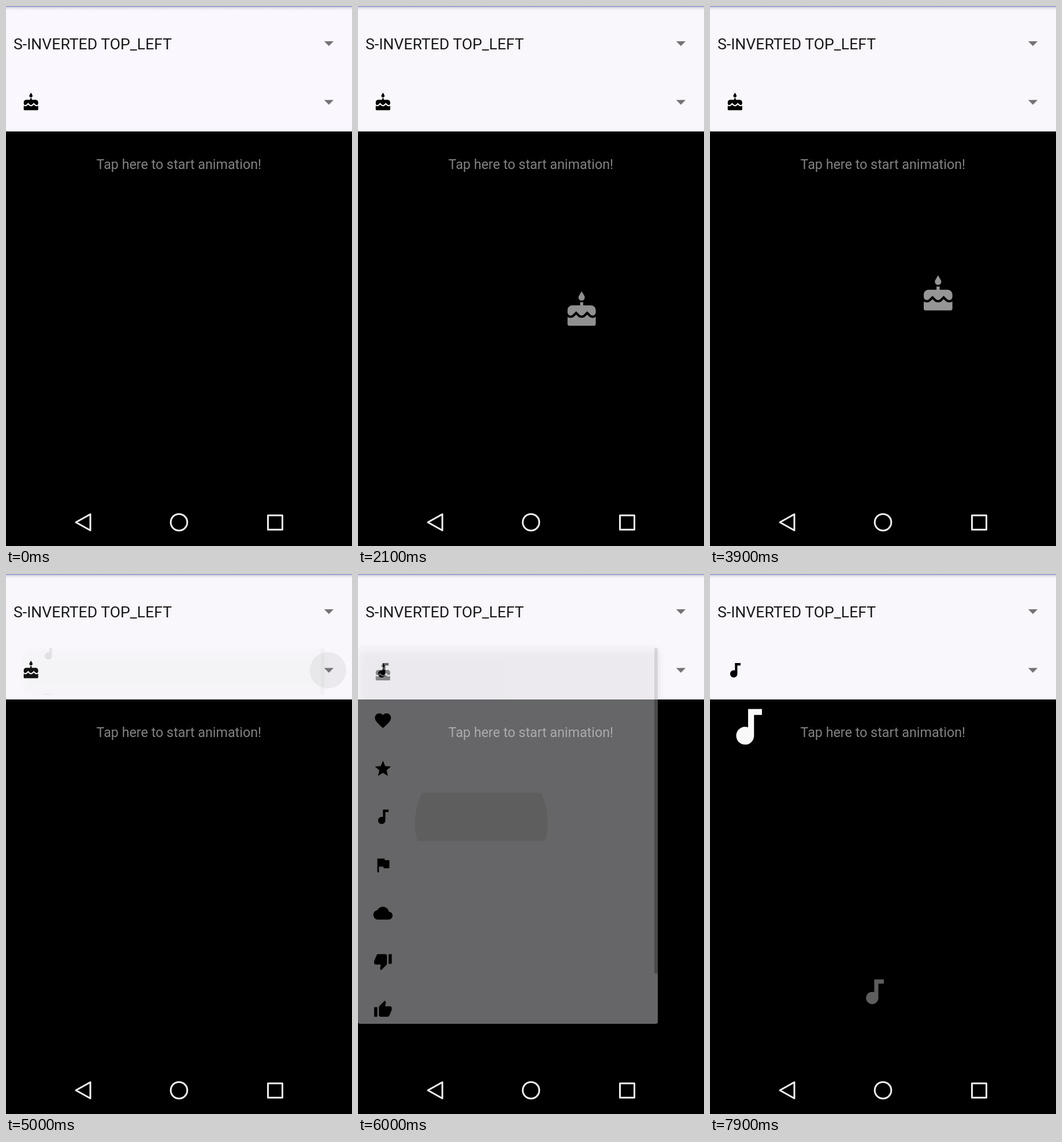
Recreate the animation shown at these times as an HTML page. Size 599 by 934 pixels, loop 8000 ms.

```html
<!DOCTYPE html>
<html lang="en">
<head>
<meta charset="utf-8">
<title>Flying icons</title>
<style>
  html, body { margin: 0; width: 100%; height: 100%; overflow: hidden; background: #000; }
  svg { display: block; width: 599px; height: 934px; }
  text { font-family: Roboto, sans-serif; }
  .nav { fill: none; stroke: #eee; stroke-width: 3; stroke-linejoin: round; }
  .hidden { display: none; }
</style>
</head>
<body>
<svg viewBox="0 0 599 934">
  <defs>
    <linearGradient id="edge" x2="0" y2="1">
      <stop stop-color="#a9afd2"/>
      <stop offset=".3" stop-color="#d9d9e6"/>
      <stop offset="1" stop-color="#f9f7fb" stop-opacity="0"/>
    </linearGradient>
    <filter id="soft" x="-10%" width="120%" y="-10%" height="120%"><feGaussianBlur stdDeviation="8"/></filter>
    <clipPath id="reveal"><rect id="window" width="519" rx="3"/></clipPath>
    <clipPath id="row"><rect y="378.4" width="512" height="83.3"/></clipPath>

    <path id="cake" d="M12 6c1.11 0 2-.9 2-2 0-.38-.1-.73-.29-1.03L12 0l-1.71 2.97c-.19.3-.29.65-.29 1.03 0 1.1.9 2 2 2zm4.6 9.99l-1.07-1.07-1.08 1.07c-1.3 1.3-3.58 1.31-4.89 0l-1.07-1.07-1.09 1.07C6.75 16.64 5.88 17 4.96 17c-.73 0-1.4-.23-1.96-.61V21c0 .55.45 1 1 1h16c.55 0 1-.45 1-1v-4.61c-.56.38-1.23.61-1.96.61-.92 0-1.79-.36-2.44-1.01zM18 9h-5V7h-2v2H6c-1.66 0-3 1.34-3 3v1.54c0 1.08.88 1.96 1.96 1.96.52 0 1.02-.2 1.38-.57l2.14-2.13 2.13 2.13c.74.74 2.03.74 2.77 0l2.14-2.13 2.13 2.13c.37.37.86.57 1.38.57 1.08 0 1.96-.88 1.96-1.96V12c0-1.66-1.34-3-3-3z"/>
    <path id="heart" d="M12 21.35l-1.45-1.32C5.4 15.36 2 12.28 2 8.5 2 5.42 4.42 3 7.5 3c1.74 0 3.41.81 4.5 2.09C13.09 3.81 14.76 3 16.5 3 19.58 3 22 5.42 22 8.5c0 3.78-3.4 6.86-8.55 11.54z"/>
    <path id="star" d="M12 17.27L18.18 21l-1.64-7.03L22 9.24l-7.19-.61L12 2 9.19 8.63 2 9.24l5.46 4.73L5.82 21z"/>
    <path id="note" d="M12 3v9.28c-.47-.17-.97-.28-1.5-.28C8.01 12 6 14.01 6 16.5S8.01 21 10.5 21c2.31 0 4.2-1.75 4.45-4H15V6h4V3z"/>
    <path id="flag" d="M14.4 6L14 4H5v17h2v-7h5.6l.4 2h7V6z"/>
    <path id="cloud" d="M19.35 10.04C18.67 6.59 15.64 4 12 4 9.11 4 6.6 5.64 5.35 8.04 2.34 8.36 0 10.91 0 14c0 3.31 2.69 6 6 6h13c2.76 0 5-2.24 5-5 0-2.64-2.05-4.78-4.65-4.96z"/>
    <path id="down" d="M15 3H6c-.83 0-1.54.5-1.84 1.22l-3.02 7.05c-.09.23-.14.47-.14.73v2c0 1.1.9 2 2 2h6.31l-.95 4.57-.03.32c0 .41.17.79.44 1.06L9.83 23l6.59-6.59c.36-.36.58-.86.58-1.41V5c0-1.1-.9-2-2-2zm4 0v12h4V3z"/>
    <use id="up" href="#down" transform="rotate(180 12 12)"/>
    <path id="arrow" d="M0 0h16.4l-8.2 8.3z" fill="#757376"/>
    <path id="route" d="M41.6 258.6C80 267 140 283 188 302C270 334 353 369 382 423C394 446 399 478 394 504C379 570 298 665 285 720C276 754 288 812 540 822L655 826"/>
  </defs>

  <rect width="599" height="934"/>
  <rect id="header" width="599" height="217"/>
  <rect width="599" height="9" fill="url(#edge)"/>
  <rect width="599" height="1.2" fill="#8790c6"/>
  <text x="13" y="75" font-size="26.6" fill="#19181b">S-INVERTED TOP_LEFT</text>
  <circle id="press" cx="557.5" cy="166.5" r="31.5"/>
  <use href="#arrow" x="550.8" y="61"/>
  <use href="#arrow" x="550.8" y="162.5"/>
  <use id="picked" transform="translate(43.2 166.5) scale(1.387) translate(-12 -12)"/>
  <text x="299.3" y="282" font-size="23.3" text-anchor="middle" fill="#828282">Tap here to start animation!</text>

  <g class="nav">
    <path d="M121 893L146 879V907z"/>
    <circle cx="299.5" cy="893" r="14.3"/>
    <rect x="453.5" y="881" width="25" height="24.7"/>
  </g>

  <g id="sky" fill="#fff"></g>

  <rect id="shadow" y="131" width="519" height="650" filter="url(#soft)"/>
  <g id="popup" clip-path="url(#reveal)">
    <g id="list">
      <rect y="128" width="519" height="650" rx="3" fill="#f8f5f9"/>
      <g clip-path="url(#row)"><circle id="ripple" cx="213.5" cy="430" opacity=".07"/></g>
      <g id="rows"></g>
      <rect x="513" y="128" width="6" height="563" opacity=".27"/>
    </g>
  </g>
</svg>
<script>
const LOOP = 8000, STEP = 100, FLIGHT = 2000;
const $ = id => document.getElementById(id);
const set = (el, attrs) => { for (const k in attrs) el.setAttribute(k, attrs[k]); };
const clamp = v => Math.min(1, Math.max(0, v));
const mix = (a, b, k) => a + (b - a) * k;
const place = (x, y, s) => `translate(${x} ${y}) scale(${s}) translate(-12 -12)`;

function addIcon(parent, name) {
  const el = document.createElementNS('http://www.w3.org/2000/svg', 'use');
  set(el, { href: '#' + name });
  return parent.appendChild(el);
}

['cake', 'heart', 'star', 'note', 'flag', 'cloud', 'down', 'up'].forEach((name, i) =>
  set(addIcon($('rows'), name), { transform: place(43.2, 170.2 + 83.3 * i, 1.387) }));

const flights = [['cake', 1183], ['cake', 3015], ['note', 6730], ['note', 7710]]
  .map(([name, start]) => ({ start, el: addIcon($('sky'), name) }));
const route = $('route'), routeLength = route.getTotalLength();

function drawFlight({ el, start }, t) {
  const u = clamp((t - start) / FLIGHT);
  const e = (1 - Math.cos(Math.PI * u)) / 2;
  const p = route.getPointAtLength(e * routeLength);
  const shown = t >= start - 50 && u < 1;
  el.classList.toggle('hidden', !shown);
  set(el, { transform: place(p.x, p.y, 3.467 * (1 - e / 2)), opacity: 1 - e });
}

function drawPopup(t) {
  const shown = t >= 5000 && t < 6100;
  $('popup').classList.toggle('hidden', !shown);
  $('shadow').classList.toggle('hidden', !shown);
  if (!shown) return;
  const open = clamp((t - 5000) / 200);
  const k = 1 - (1 - open) ** 2;
  const alpha = t >= 6000 ? .41 : mix(.08, 1, k);
  const x = mix(32, 0, k);
  set($('window'), { x, y: 128, height: mix(81, 650, k) });
  set($('list'), { transform: `translate(${x} ${mix(-284.6, 0, k)})` });
  set($('popup'), { opacity: alpha });
  set($('shadow'), { x, height: mix(78, 647, k), opacity: .2 * alpha });
  set($('ripple'), { r: t < 5800 ? 0 : mix(50, 115, (t - 5800) / 200) });
}

function draw(t) {
  set($('header'), { fill: t < 1200 ? '#faf7ff' : '#f9f7fb' });
  set($('picked'), { href: t < 6000 ? '#cake' : '#note' });
  const press = t < 5100 ? clamp((t - 4700) / 300) : clamp((5300 - t) / 300);
  set($('press'), { opacity: .055 * press });
  flights.forEach(f => drawFlight(f, t));
  drawPopup(t);
}

const begin = performance.now();
function tick() {
  const t = (performance.now() - begin) % LOOP;
  draw(Math.floor(t / STEP) * STEP);
  requestAnimationFrame(tick);
}
tick();
</script>
</body>
</html>
```
